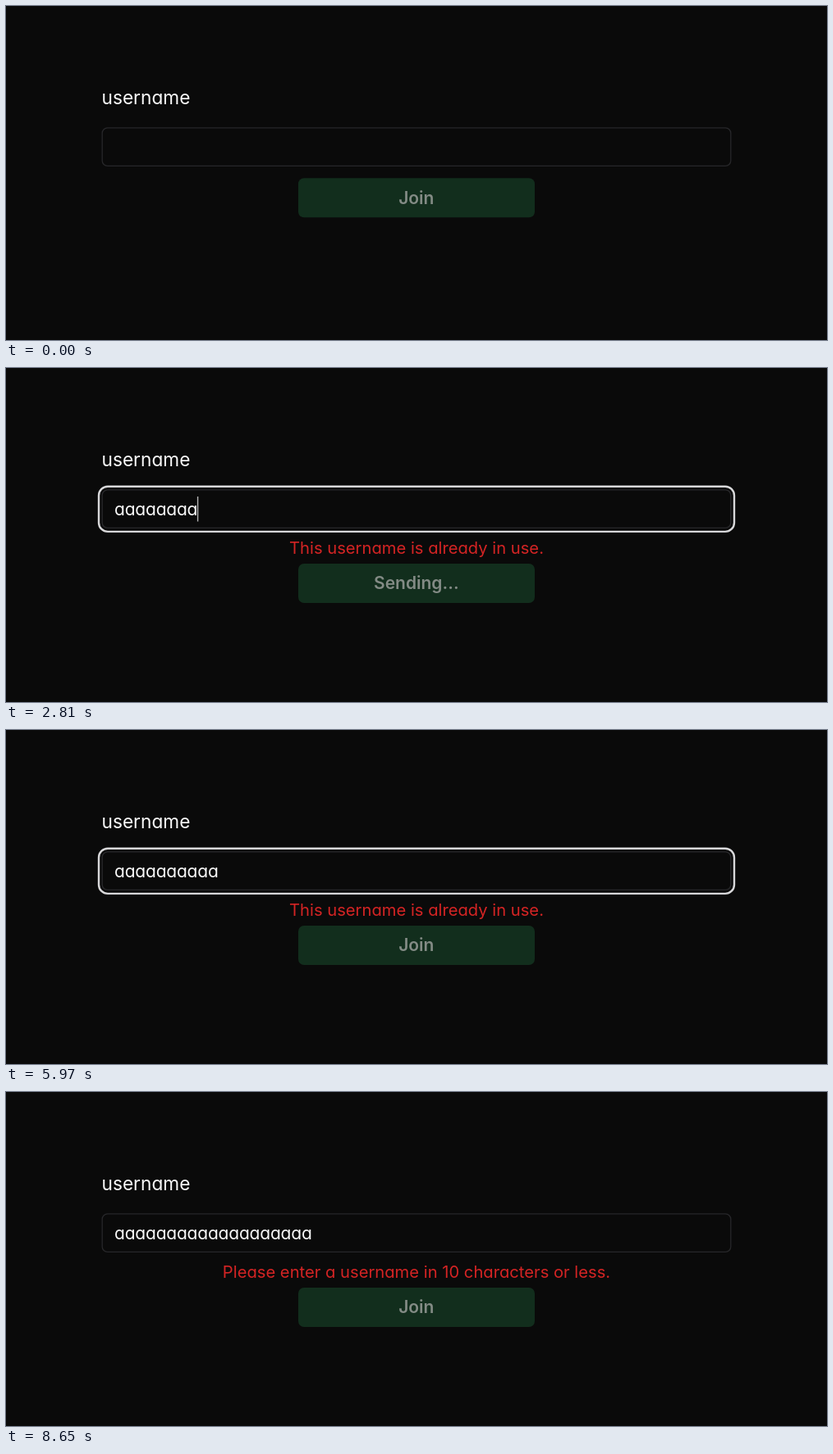
An HTML page that plays this animation: 1000 by 408 pixels, repeating every 8670 ms.

```html
<!DOCTYPE html>
<html lang="en">
<head>
<meta charset="utf-8">
<title>Username form</title>
<style>
  html, body { margin: 0; width: 100%; height: 100%; overflow: hidden; background: #0a0a0a; }
  svg { display: block; width: 100%; height: 100%; }
  text {
    font-family: Inter, "Open Sans", sans-serif;
    font-feature-settings: "cv11"; /* single-storey a */
    font-optical-sizing: none;
  }
  .label { font-size: 22.7px; fill: #fafafa; }
  .value { font-size: 21px; fill: #fafafa; }
  .error { font-size: 20.2px; fill: #d42424; text-anchor: middle; }
  .action { font-size: 21px; font-weight: 600; fill: #838b85; text-anchor: middle; }
</style>
</head>
<body>
<svg viewBox="0 0 1000 408">
  <text class="label" x="116.5" y="120">username</text>
  <rect x="117.2" y="148.8" width="765.6" height="46.6" rx="6.5" fill="none" stroke="#27272a" stroke-width="1.3"/>
  <rect id="ring" x="113" y="144.7" width="774" height="55.2" rx="11" fill="none" stroke="#d8d8da" stroke-width="2.4"/>
  <text id="value" class="value" y="180"></text>
  <rect id="caret" y="157" width="1.4" height="30.5" fill="#b4b4b4"/>
  <text id="error" class="error" x="500" y="227"></text>
  <g id="button">
    <rect x="356" y="210.3" width="288" height="48" rx="7" fill="#122e1d"/>
    <text id="action" class="action" x="499.8" y="241.5"></text>
  </g>
</svg>
<script>
const LOOP = 8670;
const TEXT_X = 132, PITCH = 12.66, ERROR_SHIFT = 28.7;
const TAKEN = "This username is already in use.";
const TOO_LONG = "Please enter a username in 10 characters or less.";
const $ = id => document.getElementById(id);

// Key repeat: one more letter per step, evenly spaced.
const repeat = (start, gap, from, to) =>
  Array.from({ length: to - from + 1 }, (_, i) => [start + i * gap, { count: from + i }]);

const steps = [
  [0, { focus: false, caret: false, count: 0, error: "", sending: false }],
  [490, { focus: true, caret: true }],
  [990, { caret: false }],
  [1280, { caret: true, count: 1 }],
  [1310, { sending: true }],
  [1510, { count: 2 }],
  ...repeat(1570, 30, 3, 7),
  [2160, { caret: false }],
  [2200, { error: TAKEN, sending: false }],
  [2650, { caret: true }],
  [2790, { count: 8 }],
  [2810, { sending: true }],
  [3300, { caret: false }],
  [3320, { sending: false }],
  [3800, { caret: true }],
  [4130, { count: 9 }],
  [4150, { sending: true }],
  [4630, { caret: false }],
  [4650, { sending: false }],
  [5120, { caret: true }],
  [5450, { count: 10 }],
  [5480, { sending: true }],
  [5940, { caret: false }],
  [5970, { sending: false }],
  [6300, { caret: true, count: 11, error: TOO_LONG }],
  ...repeat(6550, 220 / 7, 12, 19),
  [7260, { caret: false }],
  [7760, { caret: true }],
  [8250, { caret: false }],
  [8650, { focus: false }]
];

const stateAt = t =>
  Object.assign({}, ...steps.filter(([time]) => time <= t + 0.01).map(([, change]) => change));

const show = (el, on) => el.setAttribute("visibility", on ? "visible" : "hidden");

function draw(t) {
  const s = stateAt(t);
  show($("ring"), s.focus);
  show($("caret"), s.caret);
  $("caret").setAttribute("x", TEXT_X + s.count * PITCH - 0.4);
  $("value").setAttribute("x", Array.from({ length: s.count }, (_, i) => TEXT_X + i * PITCH).join(" "));
  $("value").textContent = "a".repeat(s.count);
  $("error").textContent = s.error;
  $("action").textContent = s.sending ? "Sending..." : "Join";
  $("button").setAttribute("transform", `translate(0 ${s.error ? ERROR_SHIFT : 0})`);
}

const start = performance.now();
function frame() {
  draw((performance.now() - start) % LOOP);
  requestAnimationFrame(frame);
}
frame();
</script>
</body>
</html>
```
